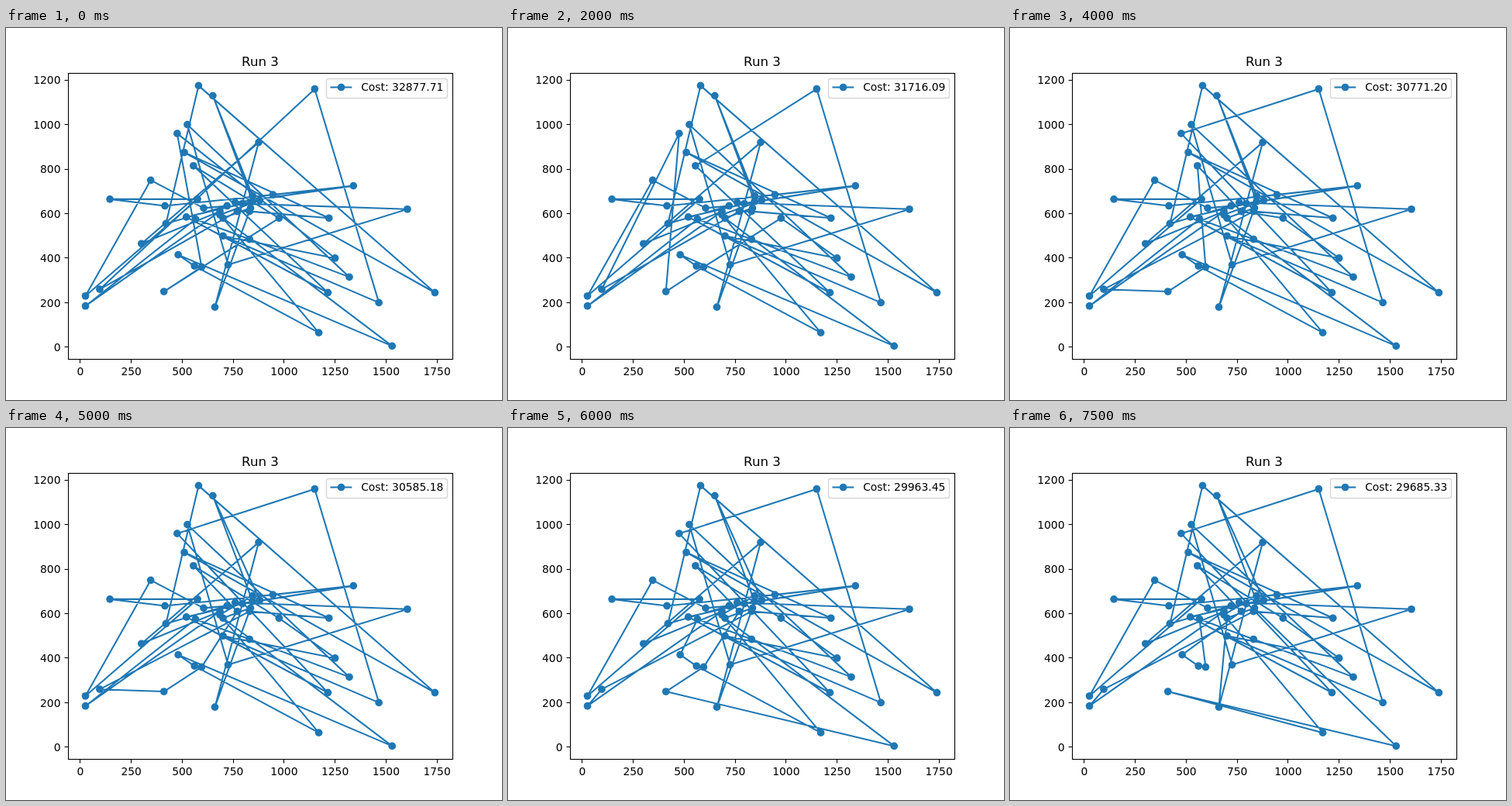
Recreate the animation shown at these times as an HTML page. Size 640x480 px, loop 8 s.

```html
<!DOCTYPE html>
<html lang="en">
<head>
<meta charset="utf-8">
<title>Run 3</title>
<style>
  html, body { margin: 0; width: 100%; height: 100%; overflow: hidden; background: #fff; }
  svg { display: block; width: 640px; height: 480px; }
  text { font: 13.89px "DejaVu Sans", sans-serif; fill: #000; }
  .title { font-size: 16.67px; }
  .line { fill: none; stroke: #1f77b4; stroke-width: 2.08; stroke-linejoin: round; }
  .dot { fill: #1f77b4; }
  .axis { fill: none; stroke: #000; stroke-width: 1.1; }
  .box { fill: #fff; fill-opacity: .8; stroke: #ccc; stroke-opacity: .8; stroke-width: 1.39; }
</style>
</head>
<body>
<svg id="plot" viewBox="0 0 640 480">
  <polygon id="tour" class="line"/>
  <g id="dots"></g>
  <g id="axes"><rect class="axis" x="80.5" y="58.5" width="496" height="369"/></g>
  <text class="title" x="328" y="49.3" text-anchor="middle">Run 3</text>
  <rect class="box" x="413.5" y="65.5" width="156" height="25" rx="2.8"/>
  <path class="line" d="M418.5 76.5H446.3"/>
  <circle class="dot" cx="432.5" cy="76.5" r="4.86"/>
  <text id="cost" x="564.3" y="81.3" text-anchor="end"></text>
</svg>
<script>
const STEP = 500;

// City coordinates, numbered from 1.
const cities = [
  [565, 575], [25, 185], [345, 750], [945, 685], [845, 655], [880, 660], [25, 230],
  [525, 1000], [580, 1175], [650, 1130], [1605, 620], [1220, 580], [1465, 200],
  [1530, 5], [845, 680], [725, 370], [145, 665], [415, 635], [510, 875], [560, 365],
  [300, 465], [520, 585], [480, 415], [835, 625], [975, 580], [1215, 245], [1320, 315],
  [1250, 400], [660, 180], [410, 250], [420, 555], [575, 665], [1150, 1160], [700, 580],
  [685, 595], [685, 610], [770, 610], [795, 645], [720, 635], [760, 650], [475, 960],
  [95, 260], [875, 920], [700, 500], [555, 815], [830, 485], [1170, 65], [830, 610],
  [605, 625], [595, 360], [1340, 725], [1740, 245]
];

const firstTour = [
  35, 47, 20, 23, 14, 34, 24, 29, 43, 21, 36, 2, 1, 46, 27, 8, 16, 11, 38, 40,
  51, 4, 18, 17, 32, 7, 3, 49, 39, 31, 9, 52, 19, 12, 48, 37, 42, 33, 13, 44,
  28, 41, 50, 30, 25, 45, 26, 22, 5, 10, 15, 6
];

// Each step: the cost, then the stretches of the tour that get reversed.
const steps = [
  ["32877.71"],
  ["32763.57", [50, 30]],
  ["31853.58", [41, 25]],
  ["31784.10", [38, 40]],
  ["31716.09", [33, 41]],
  ["31402.36", [41, 45], [33, 30]],
  ["30918.11", [42, 45]],
  ["30842.57", [37, 50]],
  ["30771.20", [50, 42]],
  ["30664.85", [45, 37]],
  ["30585.18", [15, 6]],
  ["30274.50", [1, 42]],
  ["29963.45", [14, 1]],
  ["29917.30", [24, 34]],
  ["29762.79", [20, 30]],
  ["29685.33", [23, 50]]
];

const byId = id => document.getElementById(id);
const px = x => 95.97 + x * 0.26292;
const py = y => 411.84 - y * 0.28718;

function add(parent, tag, attrs, text = "") {
  const el = document.createElementNS("http://www.w3.org/2000/svg", tag);
  for (const key in attrs) el.setAttribute(key, attrs[key]);
  el.textContent = text;
  byId(parent).append(el);
}

function reverse(tour, a, b) {
  const i = Math.min(tour.indexOf(a), tour.indexOf(b));
  const j = Math.max(tour.indexOf(a), tour.indexOf(b)) + 1;
  return [...tour.slice(0, i), ...tour.slice(i, j).reverse(), ...tour.slice(j)];
}

for (const [x, y] of cities) {
  add("dots", "circle", { class: "dot", cx: px(x), cy: py(y), r: 4.86 });
}
for (let v = 0; v <= 1750; v += 250) {
  const x = Math.floor(px(v)) + 0.5;
  add("axes", "path", { class: "axis", d: `M${x} 427.5v5` });
  add("axes", "text", { x: px(v), y: 447.8, "text-anchor": "middle" }, v);
}
for (let v = 0; v <= 1200; v += 200) {
  const y = Math.floor(py(v)) + 0.5;
  add("axes", "path", { class: "axis", d: `M80.5 ${y}h-5` });
  add("axes", "text", { x: 70.5, y: py(v) + 5.2, "text-anchor": "end" }, v);
}

let tour = firstTour;
const states = steps.map(([cost, ...moves]) => {
  for (const [a, b] of moves) tour = reverse(tour, a, b);
  const points = tour.map(n => {
    const [x, y] = cities[n - 1];
    return px(x).toFixed(2) + "," + py(y).toFixed(2);
  }).join(" ");
  return { cost, points };
});

let shown = -1;
function draw(now) {
  const k = Math.floor(now / STEP) % states.length;
  if (k !== shown) {
    shown = k;
    byId("tour").setAttribute("points", states[k].points);
    byId("cost").textContent = "Cost: " + states[k].cost;
  }
}

const start = performance.now();
function tick() {
  draw(performance.now() - start);
  requestAnimationFrame(tick);
}
tick();
</script>
</body>
</html>
```
